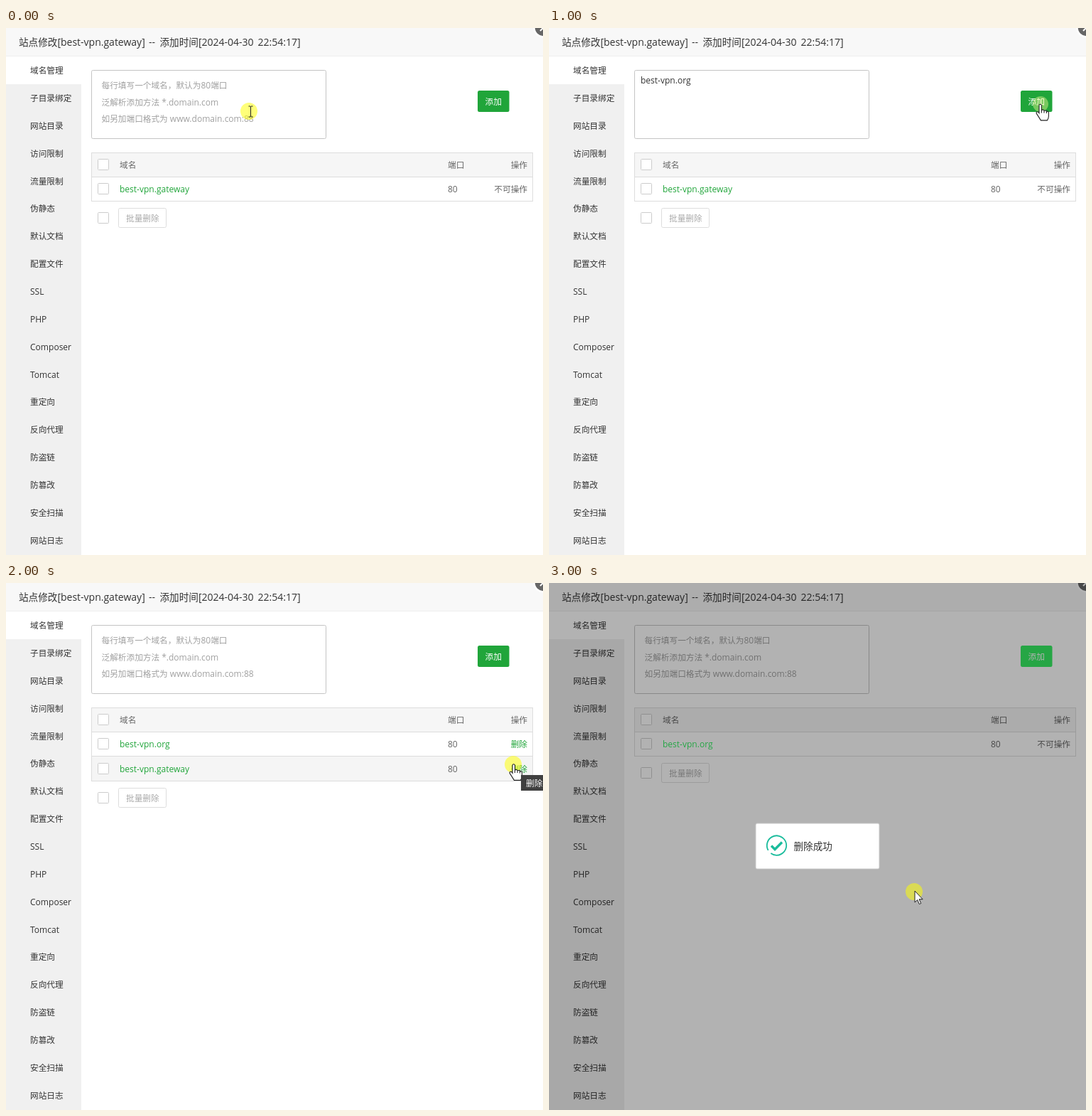
These frames come from a looping animation (756 px wide and 741 px high, 3500 ms). An HTML page:

```html
<!DOCTYPE html>
<html lang="zh-CN">
<head>
<meta charset="utf-8">
<title>站点修改</title>
<style>
html, body { margin: 0; width: 756px; height: 741px; overflow: hidden; background: #fff }
svg { display: block; font-family: "Open Sans", "Noto Sans CJK SC", "Noto Sans CJK", sans-serif }
</style>
</head>
<body>
<svg id="stage" width="756" height="741" viewBox="0 0 756 741"></svg>
<script>
const stage = document.getElementById('stage');
const SMALL = 11.67, MEDIUM = 13.6, LARGE = 17.5;
const GREEN = '#20a53a', DIMMED_GREEN = '#36ed63';   // links stay vivid under the shade
const MENU = ['域名管理', '子目录绑定', '网站目录', '访问限制', '流量限制', '伪静态', '默认文档', '配置文件', 'SSL',
  'PHP', 'Composer', 'Tomcat', '重定向', '反向代理', '防盗链', '防篡改', '安全扫描', '网站日志'];
const HINTS = ['每行填写一个域名，默认为80端口', '泛解析添加方法 *.domain.com', '如另加端口格式为 www.domain.com:88'];
const OLD = 'best-vpn.gateway', NEW = 'best-vpn.org';

// y is the vertical middle of the line; Latin runs are set slightly larger
const text = (x, y, str, fill = '#666', size = SMALL, extra = '') =>
  `<text x="${x}" y="${y + size * .38}" fill="${fill}" font-size="${size}" ${extra}>` +
  str.replace(/[!-~]+/g, run => `<tspan font-size="${size * 1.03}">${run}</tspan>`) + '</text>';
const END = 'text-anchor="end"', MIDDLE = 'text-anchor="middle"', STRONG = ' font-weight="500"';
const rect = (x, y, w, h, fill, extra = '') =>
  `<rect x="${x}" y="${y}" width="${w}" height="${h}" fill="${fill}" ${extra}/>`;
const frame = (x, y, w, h, stroke, fill = '#fff', r = 0) =>
  rect(x + .5, y + .5, w, h, fill, `stroke="${stroke}" rx="${r}"`);
const path = (d, stroke, width = 1, fill = 'none') =>
  `<path d="${d}" stroke="${stroke}" stroke-width="${width}" fill="${fill}"/>`;
const at = (x, y, body) => `<g transform="translate(${x} ${y})">${body}</g>`;
const button = (x, y, w, h, label, fill, extra = '') =>
  rect(x, y, w, h, fill, 'rx="2.5"') + text(x + w / 2, y + h / 2 + .3, label, '#fff', SMALL, MIDDLE + extra);
const checkbox = y => frame(129, y - 8, 15, 15, '#ccc', '#fff', 1);

const glow = (x, y) => `<circle cx="${x}" cy="${y}" r="12" fill="#ff0" opacity=".52"/>`;
const press = (x, y) => `<circle cx="${x}" cy="${y}" r="11" fill="#ff9" opacity=".4"/>`;
const beam = (x, y) => at(x + .5, y, path('M-3-7.5h2.5l.5 .5 .5-.5h2.5M0-7V7M-3 7.5h2.5l.5-.5 .5 .5h2.5', '#222'));
const hand = (x, y) => at(x, y, path('M-2 12V1.5a1.7 1.7 0 0 1 3.4 0V8q3-1.5 3.6 .8 3-1 3.4 1 3-.6 3 1.6v5q0 3-2 6h-9' +
  'q-3-5-6-9.5-1-2 1-2.6 1.4-.2 2.6 1.8zM1.4 8v4M5 9v3M8.4 10v2.5', '#222', 1.1, '#fff'));
const arrow = (x, y) => at(x, y, path('M0 0V16l3.7-3.5 2.6 6 2.4-1-2.6-5.8h5z', '#222', 1, '#fff'));

const closer = (x, y, fill) => at(x, y, `<circle r="13" fill="${fill}" stroke="#fff" stroke-width="2.5"/>` +
  path('M-4.5-4.5l9 9M4.5-4.5l-9 9', '#fff', 2));
const ring = colour => `<circle r="13.7" fill="none" stroke="${colour}" stroke-width="1.8"
  stroke-dasharray="80 6" transform="rotate(150)"/>`;
const tick = (x, y) => at(x, y, ring('#1abc9c') + path('M-7.5 .5l5 5 10-10', '#1abc9c', 3.4));

const shade = () => rect(0, 0, 756, 741, '#000', 'opacity=".3"');
const dialog = (x, y, w, h, title) =>
  rect(x + 1, y + 1, w, h, '#000', 'opacity=".3" filter="url(#soft)"') +
  rect(x, y, w, h, '#fff', 'rx="2"') + rect(x, y, w, 40, '#f8f8f8', 'rx="2"') +
  rect(x, y + 40, w, 1, '#eee') + text(x + 19, y + 20.3, title, '#333', MEDIUM);

const rowTop = i => Math.round(209 + 34.4 * i);
function row(i, name, action, { green, hover, visited }) {
  const middle = 227 + 34.8 * i;
  const actionColour = visited ? '#333' : action === '删除' ? green : '#666';
  return frame(120, rowTop(i), 621, rowTop(i + 1) - rowTop(i), '#ddd', hover ? '#f5f5f5' : '#fff') +
    checkbox(226 + 35 * i) + text(160, middle, name, green, SMALL, STRONG) + text(622, middle, '80') +
    text(734, middle, action, actionColour, SMALL, END + (visited ? ' text-decoration="underline"' : ''));
}

function page({ rows, dim, hover, visited, input = HINTS.map((h, i) => text(134.5, 81 + 23.5 * i, h, '#a0a0a0')).join('') }) {
  const green = dim ? DIMMED_GREEN : GREEN;
  const foot = rows.length * 35 + 232;
  return rect(0, 0, 756, 39, '#f8f8f8') + rect(0, 39, 756, 1, '#eee') +
    text(18, 19.5, `站点修改[${OLD}]`, '#333', MEDIUM) + text(201, 19.5, '--', '#333', MEDIUM) +
    text(216.5, 19.5, '添加时间[2024-04-30', '#333', MEDIUM) + text(354.5, 19.5, '22:54:17]', '#333', MEDIUM) +
    closer(756.5, -.5, '#666') +
    rect(0, 79, 106, 662, '#f0f0f0') +
    MENU.map((item, i) => text(34, 59.7 + 38.86 * i, item, '#333')).join('') +
    frame(120, 59, 330, 96, '#c4c4c4', '#fff', 2) + input +
    button(664, 88, 44.5, 30, '添加', green) +
    frame(120, 175, 621, 34, '#ddd', '#f6f6f6') + checkbox(192) +
    text(160, 193, '域名') + text(622, 193, '端口') + text(734, 193, '操作', '#666', SMALL, END) +
    rows.map((name, i) => row(i, name, rows.length > 1 ? '删除' : '不可操作',
      { green, hover: hover === i, visited: visited === i })).join('') +
    checkbox(foot) + frame(158, foot - 14, 67, 27, '#ddd', '#fff', 2) +
    text(192.3, foot + .5, '批量删除', '#aaa', SMALL, MIDDLE) + (dim ? shade() : '');
}

const hintBubble = () =>
  rect(120, -25, 233, 74.5, GREEN, 'rx="2"') + path('M133 49h8v8z', 'none', 0, GREEN) +
  HINTS.map((h, i) => text(130, -7.5 + 21.2 * i, h, '#fff')).join('');

const focusedInput = rect(119, 58, 333, 99, '#000', 'opacity=".12" rx="4"') +
  rect(121.2, 60, 328.8, 95.5, '#fff', 'stroke="#222" stroke-width="2" rx="2.5"') + rect(129, 65, 1, 15, '#222');

const resultDialog = () => dialog(208, 200, 340, 340, '添加域名结果') +
  tick(312.5, 280) + text(335, 280.5, '添加域名完成！', '#333', LARGE) +
  frame(237, 313, 281, 33, '#ddd', '#f6f6f6') + frame(237, 346, 281, 34, '#ddd') +
  text(246, 330, '域名', '#555') + text(510, 330, '操作结果', '#555', SMALL, END) +
  text(246, 364, NEW, '#555') + text(510, 364, '添加成功', GREEN, SMALL, END) + closer(546, 202, '#222');

const confirmDialog = () => dialog(203, 282.5, 350, 175, `删除域名【${OLD}】`) +
  at(232, 353.5, ring('#cdcd20')) + text(232, 353.5, '?', '#cdcd20', 20, MIDDLE + ' font-weight="600"') +
  text(256, 354.5, '删除选中的域名后，将无法使用该域名访问网', '#333', MEDIUM) +
  text(256, 378, '站，是否继续操作？', '#333', MEDIUM) +
  rect(203, 408, 350, 49.5, '#f8f8f8') + rect(203, 408, 350, 1, '#eee') +
  button(434, 418, 47, 30, '取消', '#c9c9c9', ' font-weight="700"') +
  button(488.5, 418, 47, 30, '确定', GREEN, ' font-weight="700"') + closer(551, 284.5, '#666');

const toast = () => rect(291, 338, 174, 64, '#fff', 'rx="2" stroke="#c8c8c8"') +
  tick(320.5, 369) + text(344.5, 370, '删除成功', '#333', MEDIUM);

const SCENES = [
  () => page({ rows: [OLD] }) + glow(342, 117) + beam(344, 117.5),
  () => page({ rows: [OLD], input: focusedInput }) + hintBubble() + beam(344, 117.5),
  () => page({ rows: [OLD], input: text(129, 73.5, NEW, '#333') }) + press(692, 107) + hand(692, 107.5),
  () => page({ rows: [NEW, OLD], dim: true }) + resultDialog() + glow(549, 195) + hand(549, 194),
  () => page({ rows: [NEW, OLD], hover: 1 }) + glow(714, 255) + hand(715, 255) +
    rect(725, 270, 31, 22, '#404040') + text(732, 281.5, '删除', '#fff'),
  () => page({ rows: [NEW, OLD], dim: true, visited: 1 }) + confirmDialog() + press(512, 433) + hand(512, 433.5),
  () => page({ rows: [NEW], dim: true }) + toast() + glow(514, 434) + arrow(515, 433)
];
const DEFS = `<filter id="soft" x="-1" y="-1" width="3" height="3" color-interpolation-filters="sRGB">
  <feGaussianBlur stdDeviation="25"/></filter>`;

let shown = -1;
function play() {
  const scene = Math.floor(performance.now() / 500) % SCENES.length;
  if (scene !== shown) stage.innerHTML = DEFS + SCENES[shown = scene]();
  requestAnimationFrame(play);
}
play();
</script>
</body>
</html>
```
